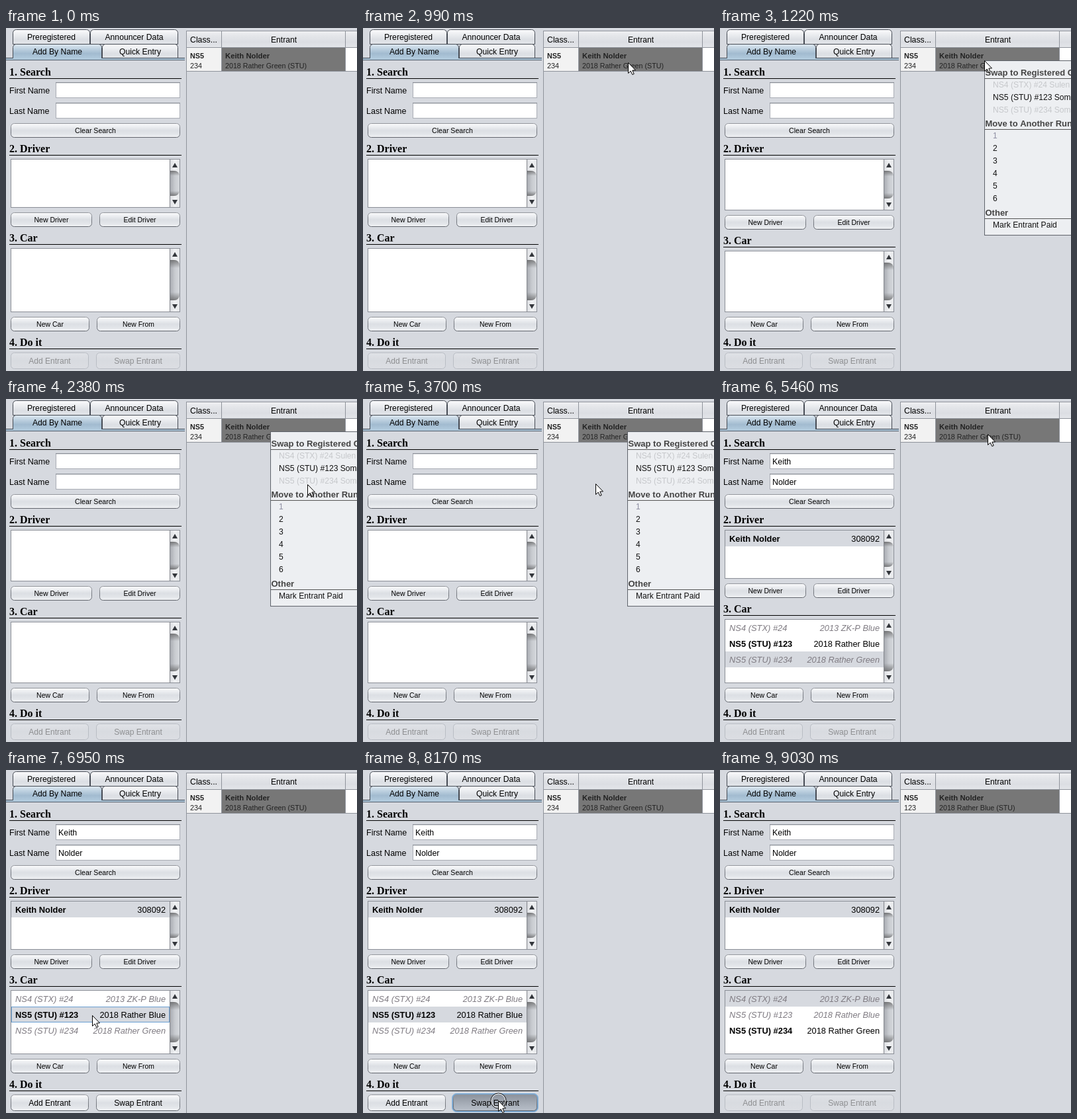
Recreate the animation shown at these times as an HTML page with a canvas. Size 530 by 519 pixels, loop 9800 ms.

```html
<!DOCTYPE html>
<html>
<head>
<meta charset="utf-8">
<style>
html, body { margin: 0; width: 530px; height: 519px; overflow: hidden; background: #d6d9df; }
canvas { display: block; }
</style>
</head>
<body>
<canvas id="stage" width="530" height="519"></canvas>
<script>
const c = document.getElementById('stage').getContext('2d');
const LOOP = 9800;
const SANS = '"Liberation Sans", Arial, sans-serif';
const SERIF = '"Liberation Serif", "Times New Roman", serif';
const FIRST = 'Keith', LAST = 'Nolder', FULL = FIRST + ' ' + LAST;
const FACE = ['#fcfcfd', '#eceef1', '#dcdfe4', '#e2e5e9', '#f4f5f7'];
const FLAT = ['#e0e2e7', '#d8dbe0', '#dcdee3'];
const PRESSED = ['#8b919b', '#a4abb5', '#b9c0ca'];
const BLUE = '#b0c9dc';

// Pointer path: time, x, y
const PATH = [
  [450, 465, 230], [1000, 399, 49], [1920, 399, 49], [2150, 455, 129],
  [2380, 455, 129], [2550, 460, 104], [3390, 460, 104], [3700, 351, 128],
  [4310, 351, 128], [4470, 399, 64], [4620, 399, 64], [4850, 404, 53],
  [6010, 404, 53], [6780, 130, 371], [7250, 130, 371], [7640, 201, 500],
  [7880, 201, 500], [7940, 204, 500], [9000, 204, 500]
];
const CLICKS = [[1070, 1220], [3850, 3930], [5080, 5250], [6780, 6950], [8170, 8250]];

const within = (t, a, b) => t >= a && t < b;

function pointerAt(t) {
  const i = PATH.findIndex(k => k[0] > t);
  if (i < 1) return null;
  const [a, b] = [PATH[i - 1], PATH[i]];
  const u = (t - a[0]) / (b[0] - a[0]);
  return [a[1] + (b[1] - a[1]) * u, a[2] + (b[2] - a[2]) * u];
}

function text(s, x, y, size = 12, color = '#000', style = '', align = 'left', family = SANS) {
  c.font = `${style} ${size}px ${family}`;
  c.textAlign = align;
  c.fillStyle = color;
  c.fillText(s, x, Math.round(y));
}

function rect(x, y, w, h, color) {
  c.fillStyle = color;
  c.fillRect(x, y, w, h);
}

function outline(x, y, w, h, color) {
  c.strokeStyle = color;
  c.lineWidth = 1;
  c.strokeRect(x + .5, y + .5, w - 1, h - 1);
}

function gradient(colors, x0, y0, x1, y1) {
  const g = c.createLinearGradient(x0, y0, x1, y1);
  colors.forEach((k, i) => g.addColorStop(i / (colors.length - 1), k));
  return g;
}

function rounded(x, y, w, h, radius, fill, stroke) {
  c.beginPath();
  c.roundRect(x + .5, y + .5, w - 1, h - 1, radius);
  c.fillStyle = fill;
  c.fill();
  c.strokeStyle = stroke;
  c.lineWidth = 1;
  c.stroke();
}

function tab(label, x, y, w, h, colors = FACE.slice(0, 4)) {
  rounded(x, y, w, h, [5, 5, 0, 0], gradient(colors, 0, y, 0, y + h), '#474c55');
  text(label, x + w / 2, y + 16, 12.2, '#000', '', 'center');
}

function button(label, x, y, w, h, size, { enabled = true, pressed, focus } = {}) {
  if (focus) rounded(x - 2, y - 2, w + 4, h + 4, 7, '#73a4d1', '#8fb6da');
  const face = pressed ? PRESSED : enabled ? FACE : FLAT;
  const edge = enabled ? gradient(['#94979d', '#60646c'], 0, y, 0, y + h) : '#b9bdc4';
  rounded(x, y, w, h, 5, gradient(face, 0, y, 0, y + h), edge);
  text(label, x + w / 2, y + h / 2 + size * .34, size, enabled ? '#000' : '#8e8f91', '', 'center');
}

function heading(label, y) {
  text(label, 5, y, 16, '#000', 'bold', 'left', SERIF);
  rect(5, y + 4, 260, 1, '#000');
}

function field(label, value, y, focus, caret) {
  text(label, 5, y + 17, 12.5);
  if (focus) rounded(73, y - 2, 192, 28, 3, '#84aed5', '#a9c4de');
  rect(75, y, 188, 24, '#fff');
  outline(75, y, 188, 24, focus ? '#7f9ab4' : '#a9adb5');
  rect(75, y, 188, 1, '#888c94');
  rect(76, y + 1, 186, 1, '#dfe1e4');
  text(value, 79, y + 17, 12.4);
  if (caret) rect(79, y + 4, 1, 16, '#000');
}

function arrow(y, dir) {
  c.beginPath();
  c.moveTo(251, y + 3 * dir);
  c.lineTo(259, y + 3 * dir);
  c.lineTo(255, y - 4 * dir);
  c.fillStyle = '#33363b';
  c.fill();
}

function list(y, bottom) {
  const top = y + 18, h = bottom - y - 36;
  rect(7, y, 256, bottom - y, '#fff');
  rect(247, y, 16, bottom - y, gradient(['#d9dbdf', '#f1f2f4', '#e3e5e8'], 247, 0, 263, 0));
  // Recessed track, shaded towards its curved ends
  c.beginPath();
  c.roundRect(248, top, 14, h, [0, 8, 8, 0]);
  c.fillStyle = gradient(['#a9acb2', '#c8cbd0', '#d6d9dd'], 248, 0, 262, 0);
  c.fill();
  c.fillStyle = gradient(['#555a', '#5550', '#5550', '#5550', '#5550', '#555a'], 0, top, 0, top + h);
  c.fill();
  rect(247, y, 1, bottom - y, '#84878d');
  arrow(y + 10, 1);
  arrow(bottom - 9, -1);
  outline(7, y, 256, bottom - y, '#8a8e96');
}

function listRow(left, right, y, look, selected, focus) {
  if (selected) rect(8, y, 239, 24, '#d6d9df');
  if (focus) outline(8, y, 239, 24, '#6a9fd2');
  const gray = look === 'italic';
  const color = gray ? '#7f7b82' : '#000';
  text(left, 14, y + 17, 12.9, color, look);
  text(right, 241, y + 17, 12.8, color, gray ? look : '', 'right');
}

function drawCars(t) {
  const swapped = t >= 8250;
  const selected = t < 6780 ? 2 : t < 8710 ? 1 : 0;
  const rows = [
    ['NS4 (STX) #24', '2013 ZK-P Blue'],
    ['NS5 (STU) #123', '2018 Rather Blue'],
    ['NS5 (STU) #234', '2018 Rather Green']
  ];
  const free = swapped ? 2 : 1;
  rows.forEach(([left, right], i) => listRow(left, right, 334 + 24 * i,
    i === free ? 'bold' : 'italic', i === selected, i === 1 && within(t, 6950, 8170)));
}

function drawForm(t) {
  tab('Preregistered', 10, 2, 117, 23);
  tab('Announcer Data', 127, 2, 133, 23);
  tab('Quick Entry', 145, 24, 115, 22);
  rect(0, 45, 270, 4, BLUE);
  rect(0, 45, 270, 1, '#3d4652');
  rect(0, 48, 270, 1, '#56616e');
  tab('Add By Name', 10, 24, 135, 22, ['#e2ebf2', '#bfd2e1', '#a2bbd0', BLUE]);
  rect(11, 45, 133, 1, BLUE);

  const filled = t >= 5330;
  const focus = within(t, 1070, 1220) || within(t, 3930, 5330);
  const caret = focus && !within(t, 4400, 4800);
  heading('1. Search', 72);
  field('First Name', filled ? FIRST : '', 82, focus, caret);
  field('Last Name', filled ? LAST : '', 113);
  button('Clear Search', 7, 144, 256, 22, 10.6);

  // An empty form has a slightly taller driver section
  const shift = within(t, 1070, 5450) ? 4 : 0;
  heading('2. Driver', 188);
  list(198, 272 + shift);
  if (filled) listRow(FULL, '308092', 199, 'bold', true);
  button('New Driver', 7, 279 + shift, 123, 22, 10.5);
  button('Edit Driver', 141, 279 + shift, 122, 22, 10.5);

  heading('3. Car', 323 + shift);
  list(333 + shift, 430);
  if (t >= 5450) drawCars(t);
  button('New Car', 7, 437, 119, 22, 10.5);
  button('New From', 137, 437, 126, 22, 10.4);

  heading('4. Do it', 481);
  const enabled = within(t, 6950, 8710);
  button('Add Entrant', 7, 491, 118, 25, 12, { enabled });
  button('Swap Entrant', 136, 491, 127, 25, 12.1,
    { enabled, pressed: within(t, 8170, 8250), focus: within(t, 8170, 9000) });
}

function drawTable(t) {
  const swapped = t >= 8250;
  rect(272, 4, 258, 26, gradient(['#f0f1f3', '#e3e5e9', '#dcdee3', '#e4e6ea'], 0, 4, 0, 30));
  rect(273, 30, 52, 35, '#f2f2f2');
  rect(326, 30, 186, 35, '#777');
  rect(513, 30, 17, 35, '#fff');
  for (const y of [4, 29, 65]) rect(272, y, 258, 1, '#8f939b');
  for (const x of [325, 512]) rect(x, 4, 1, 62, '#8f939b');
  rect(272, 4, 1, 515, '#8f939b');
  text('Class...', 278, 22, 12.3);
  text('Entrant', 419.5, 22, 12.1, '#000', '', 'center');
  text('NS5', 278, 46, 10.8, '#222', 'bold');
  text(swapped ? '123' : '234', 278, 61, 10.8, '#222');
  text(FULL, 331, 46, 11.3, '#222', 'bold');
  text(`2018 Rather ${swapped ? 'Blue' : 'Green'} (STU)`, 331, 61, 10.7, '#222');
}

function drawMenu([x, y]) {
  const hover = x >= 400 && within(y, 95, 114);
  rect(399, 49, 140, 265, '#edeff2');
  outline(399, 49, 140, 265, '#5f636b');
  const title = (s, y) => {
    text(s, 400.5, y, 13, '#444', 'bold');
    rect(400, y + 4, 130, 1, '#555');
  };
  const item = (s, y, color = '#111') => text(s, 412, y, 12.1, color);
  title('Swap to Registered Car', 72);
  if (hover) rect(400, 95, 130, 19, '#39698a');
  item('NS4 (STX) #24 Sulen', 90, '#c6c8cb');
  item('NS5 (STU) #123 Some', 109, hover ? '#fff' : '#111');
  item('NS5 (STU) #234 Some', 128, '#c6c8cb');
  title('Move to Another Run', 149);
  for (let i = 0; i < 6; i++) item(i + 1, 167 + 19 * i, i ? '#111' : '#8e8fa3');
  title('Other', 284);
  item('Mark Entrant Paid', 302);
}

function drawPointer([x, y], clicking) {
  x = Math.round(x);
  y = Math.round(y);
  if (clicking) {
    c.lineWidth = 1;
    for (const [r, color] of [[11.5, '#000'], [10.5, '#fff']]) {
      c.beginPath();
      c.arc(x + .5, y + .5, r, 0, 7);
      c.strokeStyle = color;
      c.stroke();
    }
  }
  c.save();
  c.translate(x + .5, y + .5);
  c.beginPath();
  for (const p of [[0, 0], [0, 16], [3.7, 12.6], [6.3, 18], [8.7, 17], [6.3, 11.6], [11, 11.4]]) c.lineTo(...p);
  c.closePath();
  c.fillStyle = '#fff';
  c.fill();
  c.strokeStyle = '#000';
  c.lineWidth = 1;
  c.stroke();
  c.restore();
}

const start = performance.now();

function draw() {
  const t = (performance.now() - start) % LOOP;
  const pointer = pointerAt(t);
  rect(0, 0, 530, 519, '#d6d9df');
  drawForm(t);
  drawTable(t);
  if (within(t, 1220, 3930)) drawMenu(pointer);
  if (pointer) drawPointer(pointer, CLICKS.some(([a, b]) => within(t, a, b)));
  requestAnimationFrame(draw);
}
draw();
</script>
</body>
</html>
```
